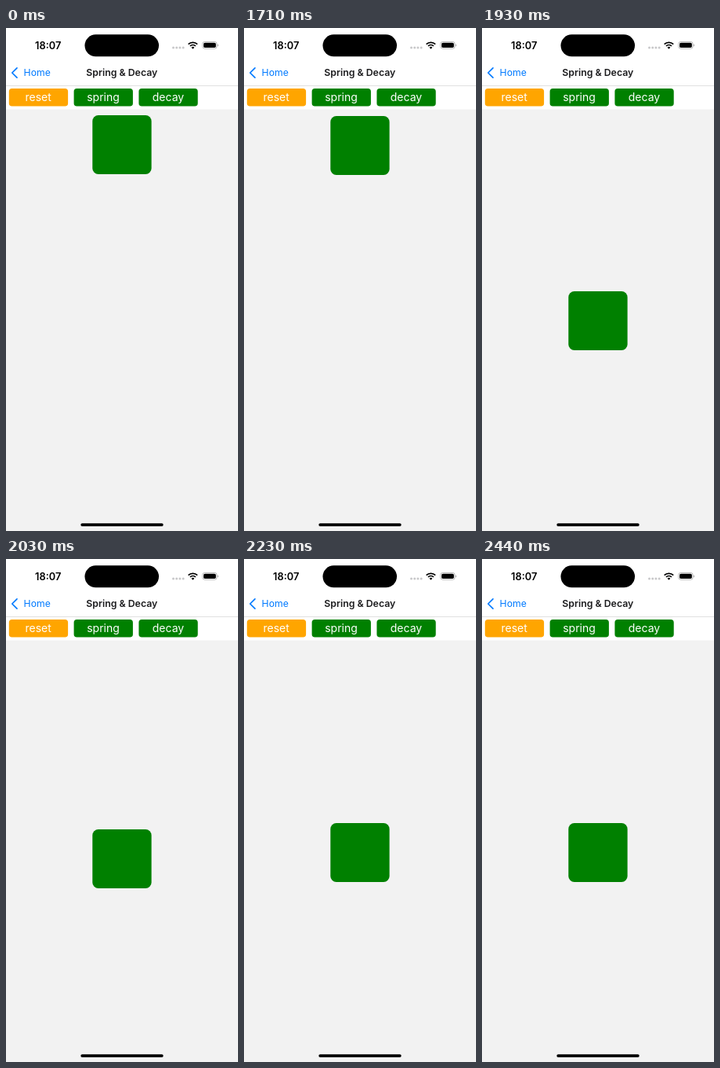
Animation, 296 px wide and 640 px high, one loop 3.63 s. Source, as an HTML page:

```html
<!DOCTYPE html>
<html lang="en">
<head>
<meta charset="utf-8">
<title>Spring &amp; Decay</title>
<style>
  html, body { margin: 0; width: 100%; height: 100%; overflow: hidden; background: #fff; }
  svg { display: block; width: 100%; height: 100%; font-family: Inter, "Open Sans", sans-serif; }
  .label { font-size: 14px; fill: #fff; text-anchor: middle; }
  .strong { font-weight: 600; text-anchor: middle; }
</style>
</head>
<body>
<svg viewBox="0 0 296 640">
  <rect width="296" height="640" fill="#fff"/>
  <rect y="103.5" width="296" height="536.5" fill="#f2f2f2"/>

  <!-- Status bar -->
  <text class="strong" x="53.7" y="26.6" font-size="12.8">18:07</text>
  <rect x="100.5" y="8.3" width="94.5" height="28" rx="14"/>
  <g fill="#c8c8ca">
    <circle cx="213.5" cy="25" r="1.5"/>
    <circle cx="217.7" cy="25" r="1.5"/>
    <circle cx="221.9" cy="25" r="1.5"/>
    <circle cx="226.1" cy="25" r="1.5"/>
  </g>
  <g fill="none" stroke="#000" stroke-width="1.7">
    <path d="M232.6 20.6a8.4 8.4 0 0 1 11.6 0"/>
    <path d="M234.9 22.9a5.2 5.2 0 0 1 7 0"/>
  </g>
  <path d="M238.4 26.7l-1.9-2a2.8 2.8 0 0 1 3.8 0z"/>
  <rect x="250.7" y="17.4" width="18.4" height="8.9" rx="2.9" fill="none" stroke="#a6a6a6" stroke-width=".8"/>
  <rect x="252" y="18.7" width="15.8" height="6.3" rx="1.8"/>
  <path d="M270.1 20.4v3a1.6 1.6 0 0 0 0-3z" fill="#a6a6a6"/>

  <!-- Navigation bar -->
  <path d="M14 50.8l-6.2 6.2 6.2 6.2" fill="none" stroke="#007aff" stroke-width="1.7" stroke-linecap="round" stroke-linejoin="round"/>
  <text x="22.6" y="61.4" font-size="12.2" fill="#007aff">Home</text>
  <text class="strong" x="147.8" y="61.4" font-size="12.3" fill="#1c1c1e">Spring &amp; Decay</text>
  <rect y="73" width="296" height="1" fill="#e0e0e0"/>

  <!-- Buttons -->
  <rect x="3.8" y="77" width="75.3" height="22.6" rx="3.8" fill="orange"/>
  <rect x="86.6" y="77" width="75.3" height="22.6" rx="3.8" fill="green"/>
  <rect x="169.4" y="77" width="75.3" height="22.6" rx="3.8" fill="green"/>
  <text class="label" x="41.2" y="93.4">reset</text>
  <text class="label" x="124" y="93.4">spring</text>
  <text class="label" x="207" y="93.4">decay</text>

  <rect id="box" x="110.3" y="111" width="75.3" height="75" rx="7.5" fill="green"/>
  <rect x="95.3" y="630.2" width="105.4" height="3.8" rx="1.9"/>
</svg>
<script>
  const LOOP = 3630;
  const TOP = 111, TRAVEL = 225;
  const STIFFNESS = 230.2, DAMPING = 22;

  // [time shown, spring time elapsed] in ms; each pose is held until the next.
  const STEPS = [[0, 0], [1710, 6], [1830, 122], [1930, 224], [2030, 322], [2130, 422], [2230, 522]];

  // Underdamped spring of unit mass, moving from 0 to 1.
  function spring(seconds) {
    const decay = DAMPING / 2;
    const frequency = Math.sqrt(STIFFNESS - decay * decay);
    const phase = frequency * seconds;
    return 1 - Math.exp(-decay * seconds) * (Math.cos(phase) + decay / frequency * Math.sin(phase));
  }

  const box = document.getElementById("box");
  const start = performance.now();

  function draw() {
    const time = (performance.now() - start) % LOOP;
    const elapsed = STEPS.findLast(([shownAt]) => shownAt <= time)[1];
    box.setAttribute("y", Math.round(TOP + TRAVEL * spring(elapsed / 1000)));
    requestAnimationFrame(draw);
  }
  draw();
</script>
</body>
</html>
```
